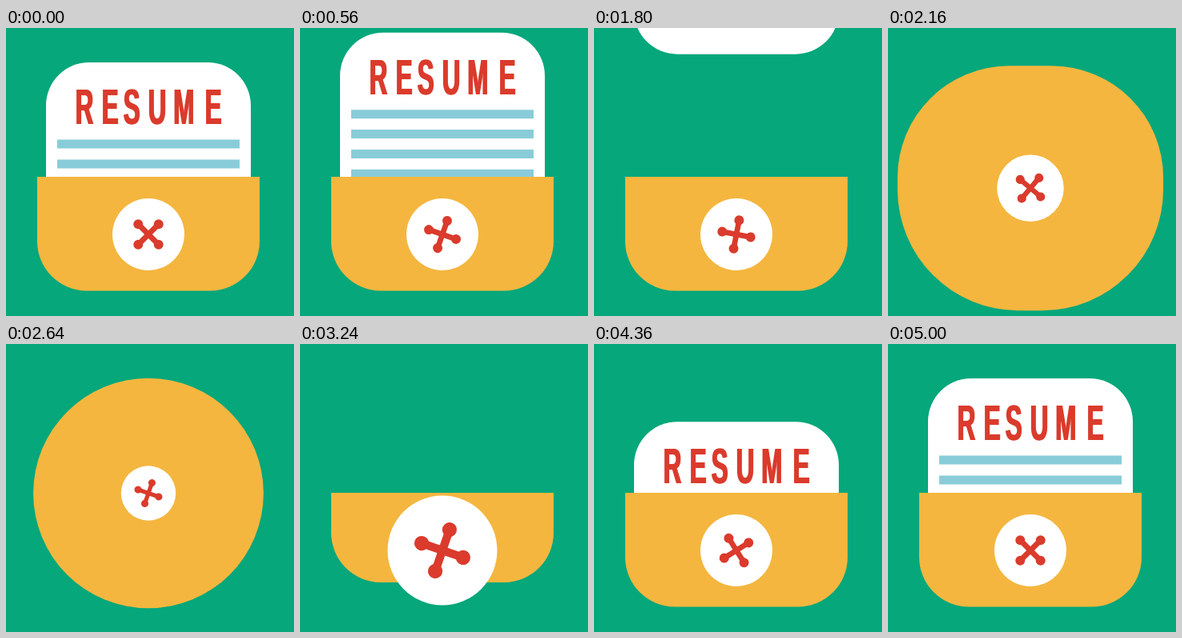
These frames come from a looping animation (360x360 px, 5.32 s). An HTML page with a canvas:

```html
<!DOCTYPE html>
<html lang="en">
<head>
<meta charset="utf-8">
<title>Resume folder</title>
<style>
  html, body { margin: 0; width: 100%; height: 100%; overflow: hidden; background: #05a77b; }
  canvas { display: block; width: 360px; height: 360px; }
</style>
</head>
<body>
<canvas id="stage" width="360" height="360"></canvas>
<script>
const ctx = document.getElementById('stage').getContext('2d');
const LOOP = 5320, STEP = 40, CX = 178;
const GREEN = '#05a77b', YELLOW = '#f4b63f', RED = '#da3b2c', BLUE = '#89ccd9';

const linear = p => p;
const smooth = p => p * p * (3 - 2 * p);
const quadIn = p => p * p;
const cubicIn = p => p * p * p;

// Keys are [time, value, easing towards this key].
function track(...keys) {
  return t => {
    const i = keys.findIndex(k => t < k[0]);
    if (i < 0) return keys[keys.length - 1][1];
    if (i === 0) return keys[0][1];
    const [t0, v0] = keys[i - 1], [t1, v1, ease = linear] = keys[i];
    return v0 + (v1 - v0) * ease((t - t0) / (t1 - t0));
  };
}

const paperTop = track(
  [0, 43], [280, 20.5, smooth], [360, 20.5], [640, 2, smooth], [720, 2], [1000, -25, smooth],
  [1160, -25], [1880, -276, quadIn], [1920, -276], [1960, 187], [3480, 187],
  [3760, 163, smooth], [3880, 163], [4200, 99, smooth], [4320, 99],
  [4600, 67.5, smooth], [4720, 67.5], [5000, 43, smooth]);

const spin = track(
  [0, 0], [280, 90], [360, 90], [640, 180], [720, 180], [1000, 270],
  [1160, 270], [1200, 283], [1800, 506], [2640, 784], [3240, 964], [3760, 1170],
  [3880, 1170], [4200, 1260], [4320, 1260], [4600, 1350], [4720, 1350], [5000, 1440]);

const pocket = {
  half: track([1800, 139], [2300, 172.5, smooth], [2840, 58, cubicIn], [3200, 139, smooth]),
  top: track([1800, 186], [2300, 14.5, smooth], [2840, 128, cubicIn], [3200, 186, smooth]),
  bottom: track([1800, 328.5], [2300, 359, smooth], [2840, 244, cubicIn], [3240, 298], [3400, 328.5]),
  topRadius: track([1800, 0], [2300, 172.5, smooth], [2840, 58, cubicIn], [3200, 0, smooth]),
  bottomRadius: track([1800, 62], [2300, 172.5, smooth], [2840, 58, cubicIn], [3200, 62, smooth])
};

const button = {
  y: track([1800, 258], [2300, 186.5, smooth], [2840, 186.5], [3160, 258, smooth]),
  radius: track([1800, 45], [2300, 41, smooth], [2840, 13.8, cubicIn], [3160, 77, smooth],
    [3240, 68.5], [3400, 53], [3600, 45])
};

function box(x, y, w, h, radii, color) {
  ctx.fillStyle = color;
  ctx.beginPath();
  ctx.roundRect(x, y, w, h, radii);
  ctx.fill();
}

function disc(x, y, r, color) {
  ctx.fillStyle = color;
  ctx.beginPath();
  ctx.arc(x, y, r, 0, 2 * Math.PI);
  ctx.fill();
}

function drawTitle(baseline) {
  const starts = [85.9, 119, 146, 177, 208.5, 248];
  ctx.save();
  ctx.translate(0, baseline);
  ctx.scale(0.5, 1);
  ctx.font = 'bold 62.5px "Liberation Sans", Arial, sans-serif';
  ctx.fillStyle = RED;
  // The second pass gives the upright stems more weight.
  for (const shift of [0, 1.6])
    [...'RESUME'].forEach((c, i) => ctx.fillText(c, (starts[i] + shift) * 2, 0));
  ctx.restore();
}

function drawPaper(top) {
  ctx.save();
  ctx.beginPath();
  ctx.rect(0, 0, 360, 187);
  ctx.clip();
  box(50, top, 256, 256, 54, '#fff');
  drawTitle(top + 77);
  for (let i = 0; i < 5; i++) box(64, top + 96.5 + i * 24.9, 228, 11, 0, BLUE);
  ctx.restore();
}

function drawPocket(t) {
  const half = pocket.half(t), top = pocket.top(t);
  const a = pocket.topRadius(t), b = pocket.bottomRadius(t);
  box(CX - half, top, half * 2, pocket.bottom(t) - top, [a, a, b, b], YELLOW);
}

function drawButton(t) {
  const size = button.radius(t) / 45;
  ctx.save();
  ctx.translate(CX, button.y(t));
  ctx.scale(size, size);
  disc(0, 0, 45, '#fff');
  ctx.rotate((45 + spin(t)) * Math.PI / 180);
  for (let i = 0; i < 2; i++) {
    box(-18, -3.4, 36, 6.8, 0, RED);
    disc(-18, 0, 6, RED);
    disc(18, 0, 6, RED);
    ctx.rotate(Math.PI / 2);
  }
  ctx.restore();
}

function draw(now) {
  const t = Math.floor((now % LOOP) / STEP) * STEP;
  box(0, 0, 360, 360, 0, GREEN);
  if (t < 1920 || t > 3440) drawPaper(paperTop(t));
  drawPocket(t);
  drawButton(t);
}

const start = performance.now();
function frame() {
  draw(performance.now() - start);
  requestAnimationFrame(frame);
}
frame();
</script>
</body>
</html>
```
